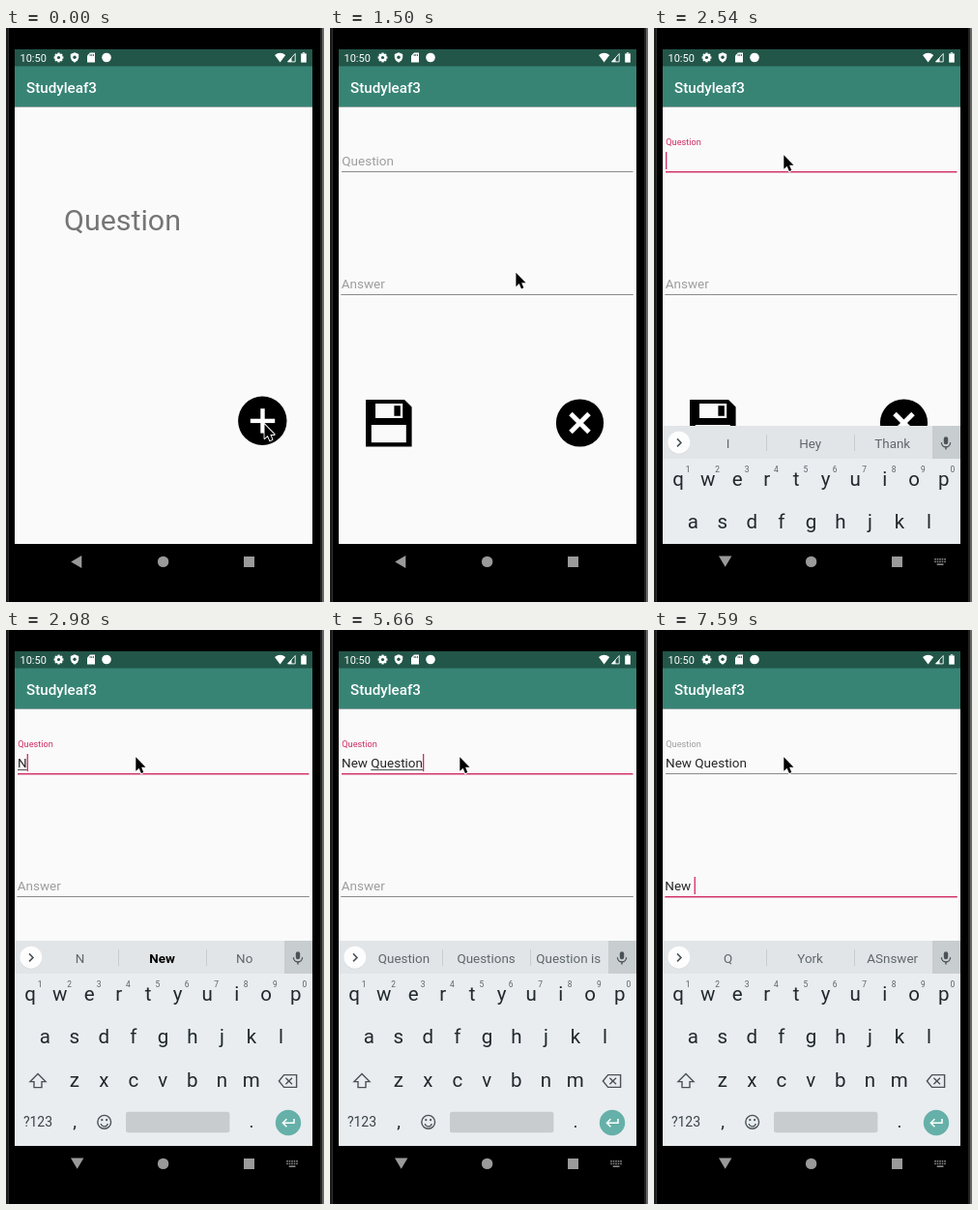
Write an HTML page with a canvas that moves like this. It is 329 px wide and 593 px high and loops after 8 s.

```html
<!DOCTYPE html>
<html lang="en">
<head>
<meta charset="utf-8">
<title>Flash card app</title>
<style>
html, body { margin: 0; width: 100%; height: 100%; overflow: hidden; background: #000; }
canvas { display: block; width: 329px; height: 593px; }
</style>
</head>
<body>
<canvas id="stage"></canvas>
<script>
const W = 329, H = 593, LOOP = 8000;
const PINK = '#cf2b64', INK = '#262626', GRAY = '#9e9e9e', NAV = '#9a9a9a';
const canvas = document.getElementById('stage');
const dpr = window.devicePixelRatio || 1;
canvas.width = W * dpr;
canvas.height = H * dpr;
const c = canvas.getContext('2d');

// The screen refreshes only at these moments.
const ticks = [0, 600, 750, 900, 1050, 1200, 1350, 1500, 1650, 1800, 1950, 2090, 2240,
  2390, 2540, 2680, 2830, 2980, 3280, 3580, 4030, 4330, 4470, 4770, 4920, 5220, 5360,
  5660, 5950, 6100, 6400, 6850, 7150, 7290, 7590];

// time, question, answer, suggestions ("_" starts the composed word, "*" marks bold)
const START = 'I|Hey|Thank';
const typing = [
  [0, '', '', START],
  [2830, '_N', '', START],
  [2980, '_N', '', 'N|*New|No'],
  [3280, '_Ne', '', 'Ne|*New|Need'],
  [3580, 'New ', '', 'Q|York|Year'],
  [4330, 'New _Q', '', 'Q|*Quote|Question'],
  [4470, 'New _Qu', '', 'Qu|*Quote|Question'],
  [4770, 'New _Que', '', 'Que|*Question|Questions'],
  [4920, 'New _Ques', '', 'Ques|*Question|Questions'],
  [5220, 'New _Quest', '', 'Quest|*Question|Questions'],
  [5360, 'New _Questio', '', 'Questio|*Question|Questions'],
  [5660, 'New _Question', '', 'Question|Questions|Question is'],
  [5950, 'New Question', '', START],
  [6850, 'New Question', '_N', 'N|*New|No'],
  [7150, 'New Question', '_Ne', 'N|*New|No'],
  [7290, 'New Question', '_Ne', 'Ne|*New|Need'],
  [7590, 'New Question', 'New ', 'Q|York|ASnswer']
];

const lastBefore = (list, t, key) => list.filter(v => key(v) <= t).pop();
const between = (t, a, b) => t >= a && t < b;
const ease = p => { p = Math.min(1, Math.max(0, p)); return p * p * (3 - 2 * p); };
const mix = (a, b, p) => a + (b - a) * p;

function rect(x, y, w, h, color) {
  c.fillStyle = color;
  c.fillRect(x, y, w, h);
}
function disc(x, y, r, color) {
  c.fillStyle = color;
  c.beginPath();
  c.arc(x, y, r, 0, Math.PI * 2);
  c.fill();
}
function trace(points, close) {
  c.beginPath();
  for (let i = 0; i < points.length; i += 2) c.lineTo(points[i], points[i + 1]);
  if (close) c.closePath();
}
function poly(points, color) {
  trace(points, true);
  c.fillStyle = color;
  c.fill();
}
function line(points, color, width, close) {
  trace(points, close);
  c.strokeStyle = color;
  c.lineWidth = width;
  c.stroke();
}
function text(s, x, y, size, color, align = 'left', weight = 400) {
  c.font = `${weight} ${size}px Roboto, sans-serif`;
  c.textAlign = align;
  c.fillStyle = color;
  c.fillText(s, x, y);
}

function bars() {
  rect(9, 22, 308, 18, '#225649');
  rect(9, 39.5, 308, 42, '#378475');
  rect(9, 81.5, 308, 451.5, '#fafafa');
  text('Studyleaf3', 21, 66.5, 15.2, '#fff', 'left', 500);
}

function statusIcons() {
  text('10:50', 14.5, 34.5, 11, '#fff');
  // gear
  for (let i = 0; i < 4; i++) {
    c.save();
    c.translate(54.5, 30.5);
    c.rotate(i * Math.PI / 4);
    rect(-1.2, -4.9, 2.4, 9.8, '#fff');
    c.restore();
  }
  disc(54.5, 30.5, 3.7, '#fff');
  disc(54.5, 30.5, 1.6, '#225649');
  poly([71, 25.3, 75.2, 27, 75.2, 30.5, 74, 33.5, 71, 35.8, 68, 33.5, 66.8, 30.5, 66.8, 27], '#fff');
  disc(71, 30.3, 1.7, '#225649');
  poly([87, 25.6, 92, 25.6, 92, 35.4, 84, 35.4, 84, 28.6], '#fff');
  for (let i = 0; i < 3; i++) rect(86.7 + i * 1.7, 27, 0.8, 2, '#225649');
  disc(104, 30.5, 4.8, '#fff');
  // wifi, signal, battery
  c.beginPath();
  c.moveTo(283.6, 35.5);
  c.lineTo(278, 28);
  c.quadraticCurveTo(283.6, 23.6, 289.2, 28);
  c.fillStyle = '#fff';
  c.fill();
  line([291.5, 34.9, 299.2, 34.9, 299.2, 26.5], '#fff', 0.9, true);
  poly([291.5, 35, 295.5, 35, 295.5, 30.5], '#fff');
  rect(305.2, 26.4, 5.6, 9.2, '#fff');
  rect(306.8, 25.3, 2.4, 1.2, '#fff');
}

function home() {
  bars();
  text('Question', 60, 209, 30.4, '#757575');
  disc(265.3, 405.8, 25.2, '#000');
  rect(252.8, 403.7, 25.4, 4.4, '#fff');
  rect(263.3, 393.2, 4.4, 25.4, '#fff');
}

function caret(x, y) { rect(x, y - 14, 1.3, 18, PINK); }

// Draws entered text and returns the caret position.
function entry(s, x, y) {
  const mark = s.indexOf('_'), plain = s.replace('_', '');
  text(plain, x, y, 13.5, INK);
  const end = x + c.measureText(plain).width;
  if (mark >= 0) {
    const from = x + c.measureText(s.slice(0, mark)).width;
    rect(from, y + 2, end - from, 0.8, INK);
  }
  return end;
}

function underline(x, y, w, active) {
  rect(x, y, w, active ? 1.4 : 1, active ? PINK : '#8b8b8b');
}

function saveIcon() {
  poly([37, 384, 77, 384, 84.6, 391.5, 84.6, 432.4, 37, 432.4], '#000');
  rect(47, 388, 28.2, 15, '#fafafa');
  rect(66.4, 390.2, 6.4, 10.6, '#000');
  rect(42.8, 410, 36, 18.2, '#fafafa');
}

function editor(t, row) {
  bars();
  const inQuestion = between(t, 2240, 5950), inAnswer = t >= 5950;
  const caretOn = !between(t, 4030, 4330) && !between(t, 6400, 6850);
  const float = t < 2240 ? 0 : t < 2390 ? 0.6 : 1;
  text('Question', 12.3, mix(142, 121.2, float), mix(13.5, 9.2, float), inQuestion ? PINK : GRAY);
  underline(12, 148, 301.5, inQuestion);
  const qEnd = entry(row[1], 12, 142);
  if (inQuestion && caretOn) caret(qEnd, 142);

  if (!row[2]) text('Answer', 11.7, 269, 13.5, GRAY);
  underline(11.3, 275, 302.5, inAnswer);
  const aEnd = entry(row[2], 11.3, 269);
  if (inAnswer && caretOn) caret(aEnd, 269);

  saveIcon();
  disc(258.5, 408, 24.6, '#000');
  line([249, 398.5, 268, 417.5], '#fff', 5);
  line([268, 398.5, 249, 417.5], '#fff', 5);
}

function keyRow(keys, x, y) {
  [...keys].forEach((k, i) => text(k, x + i * 30.5, y, 20.5, '#22292c', 'center'));
}

function keyboard(words) {
  const icon = '#4a5256';
  rect(9, 321, 308, 213, '#e9edf0');
  rect(9, 321, 308, 34, '#e1e5e8');
  rect(288, 321, 29, 34, '#c8cdd0');
  disc(25.8, 338.8, 11.7, '#d3d7d9');
  disc(25.8, 338.2, 11.5, '#fdfdfd');
  line([24, 334.4, 28, 338.4, 24, 342.4], icon, 1.5);
  rect(116, 330, 1, 17, '#c7cccf');
  rect(207, 330, 1, 17, '#c7cccf');
  words.split('|').forEach((w, i) => {
    const bold = w[0] === '*';
    text(w.replace('*', ''), 76.5 + i * 85.1, 343.6, 13.4, bold ? '#000' : '#60676b', 'center', bold ? 700 : 400);
  });
  // microphone
  c.lineCap = 'round';
  line([302, 334.4, 302, 338], icon, 4.4);
  c.lineCap = 'butt';
  c.beginPath();
  c.arc(302, 338.2, 4.6, 0, Math.PI);
  c.strokeStyle = icon;
  c.lineWidth = 1.3;
  c.stroke();
  line([302, 342.5, 302, 345.6], icon, 1.4);

  keyRow('qwertyuiop', 25.2, 383.3);
  keyRow('asdfghjkl', 40.4, 427.3);
  keyRow('zxcvbnm', 70.8, 471.6);
  [...'1234567890'].forEach((d, i) => text(d, 35.2 + i * 30.4, 368.8, 8.4, '#596165', 'center'));

  line([33, 458.5, 41, 466.6, 37, 466.6, 37, 472.6, 29, 472.6, 29, 466.6, 25, 466.6], icon, 1.4, true);
  line([282.4, 466, 287.6, 459.6, 300.6, 459.6, 300.6, 472.4, 287.6, 472.4], icon, 1.4, true);
  line([289.4, 462.7, 296, 469.3], icon, 1.4);
  line([296, 462.7, 289.4, 469.3], icon, 1.4);

  text('?123', 33, 513.3, 14, '#3a4347', 'center');
  text(',', 71, 514.3, 19, '#22292c', 'center');
  text('.', 254, 514.3, 19, '#22292c', 'center');
  c.strokeStyle = icon;
  c.lineWidth = 1.4;
  c.beginPath();
  c.arc(101.7, 508.3, 6.9, 0, Math.PI * 2);
  c.stroke();
  c.beginPath();
  c.arc(101.7, 509.3, 3.6, 0.2, Math.PI - 0.2);
  c.stroke();
  disc(99.3, 506.2, 1.1, icon);
  disc(104.1, 506.2, 1.1, icon);
  c.fillStyle = '#c8cccf';
  c.beginPath();
  c.roundRect(124, 497.8, 107.4, 21.4, 2.5);
  c.fill();
  disc(292, 509, 13.2, '#65b0a8');
  line([298, 505, 298, 509.2, 286.6, 509.2], '#fff', 1.5);
  line([290.4, 505.2, 286.4, 509.2, 290.4, 513.2], '#fff', 1.5);
}

function nav(t) {
  if (t >= 2540) poly([67, 545.5, 80.4, 545.5, 73.7, 556.8], NAV);
  else poly([78.3, 545, 78.3, 558, 67.2, 551.5], NAV);
  disc(162.6, 551.4, 5.7, NAV);
  rect(246, 546, 11, 11, NAV);
  if (t >= 2240) {
    for (let y = 0; y < 2; y++)
      for (let x = 0; x < 5; x++) rect(290.2 + x * 2.5, 548 + y * 2.6, 1.6, 1.6, '#858585');
    rect(292.7, 553.4, 6.8, 1.6, '#858585');
  }
}

function pointer(x, y) {
  const shape = [0, 0, 0, 14.5, 3.3, 11.4, 5.6, 16.8, 8, 15.7, 5.8, 10.5, 10.2, 10.5];
  c.save();
  c.translate(x, y);
  c.lineJoin = 'round';
  line(shape, '#fff', 1.8, true);
  poly(shape, '#000');
  c.restore();
}

function zoomed(scale, alpha, draw) {
  c.save();
  c.globalAlpha = alpha;
  c.translate(163, 295);
  c.scale(scale, scale);
  c.translate(-163, -295);
  draw();
  c.restore();
}

function bezel() {
  rect(0, 0, W, H, '#000');
  rect(0, 0, 2, H, '#1b1b1b');
  rect(2, 0, 1, H, '#2c2c2c');
  rect(325, 0, 2, H, '#222');
  rect(327, 0, 2, H, '#666');
}

function draw(now) {
  const t = lastBefore(ticks, now, v => v);
  const row = lastBefore(typing, t, r => r[0]);
  c.setTransform(dpr, 0, 0, dpr, 0, 0);
  bezel();

  c.save();
  c.beginPath();
  c.rect(9, 22, 308, 546);
  c.clip();
  // The new screen grows in over the old one.
  const opening = between(t, 600, 750);
  if (t < 750) zoomed(opening ? 1.05 : 1, 1, home);
  if (t >= 600) zoomed(opening ? 0.96 : 1, opening ? 0.9 : 1, () => editor(t, row));
  c.restore();

  if (t >= 2540) {
    c.save();
    c.beginPath();
    c.rect(9, 300, 308, 233);
    c.clip();
    c.translate(0, t < 2680 ? 90 : 0);
    keyboard(row[3]);
    c.restore();
  }
  statusIcons();
  nav(t);
  const p = ease((t - 800) / 1290);
  pointer(mix(267.5, 134.3, p), mix(409.5, 131.3, p));
}

function frame() {
  draw(performance.now() % LOOP);
  requestAnimationFrame(frame);
}
frame();
</script>
</body>
</html>
```
